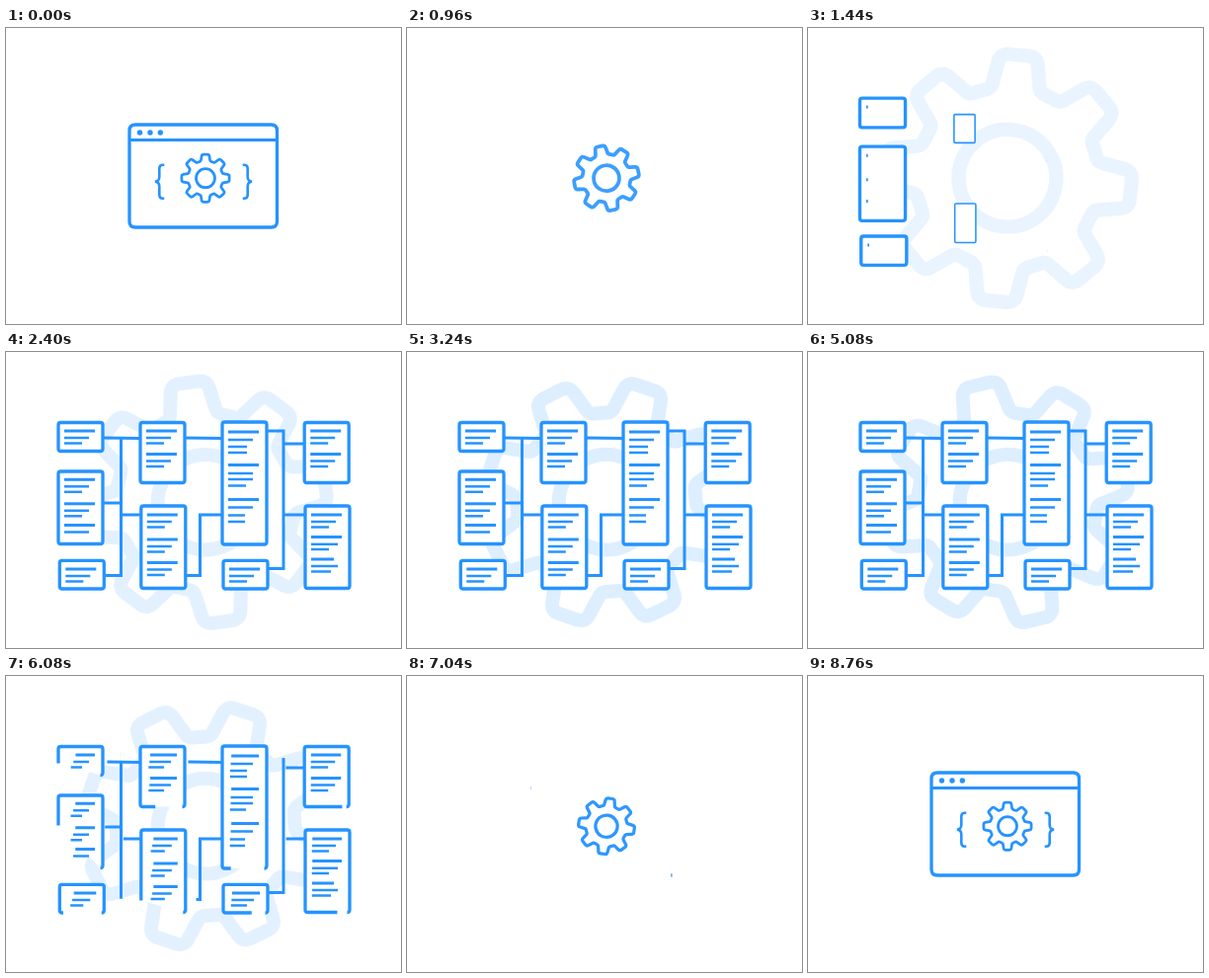
An HTML page for the animation above (9000 ms loop, 400x300 px).

```html
<!DOCTYPE html>
<html lang="en">
<head>
<meta charset="utf-8">
<title>Gear and diagram</title>
<style>
  html, body { margin: 0; width: 100%; height: 100%; overflow: hidden; background: #fff; }
  svg { display: block; width: 100vw; height: 100vh; }
</style>
</head>
<body>
<svg id="stage" viewBox="0 0 400 300" fill="none" stroke="#2693ff"></svg>
<script>
const LOOP = 9000;
const stage = document.getElementById('stage');

function add(tag, attrs, parent = stage) {
  const node = document.createElementNS('http://www.w3.org/2000/svg', tag);
  set(node, attrs);
  parent.appendChild(node);
  return node;
}
function set(node, attrs) {
  for (const key in attrs) node.setAttribute(key, attrs[key]);
}
const clamp = u => Math.min(1, Math.max(0, u));
const ease = u => u < .5 ? 2 * u * u : 1 - 2 * (1 - u) * (1 - u);
const phase = (t, start, length) => ease(clamp((t - start) / length));
const mix = (a, b, u) => a + (b - a) * u;

// Linear interpolation through [time, value] keys.
function track(keys, t) {
  let i = 1;
  while (i < keys.length - 1 && t > keys[i][0]) i++;
  const [t0, a] = keys[i - 1], [t1, b] = keys[i];
  return mix(a, b, clamp((t - t0) / (t1 - t0)));
}

// Shows the part of a path between the fractions from and to.
function trim(node, from, to) {
  set(node, {
    visibility: to - from > .0005 ? 'visible' : 'hidden',
    'stroke-dasharray': from <= 0 && to >= 1 ? 'none' : `0 ${from} ${to - from} 2`
  });
}
const stroke = (d, width, parent) => add('path', { d, 'stroke-width': width, pathLength: 1 }, parent);

// Rounded rectangle starting at the bottom right, running clockwise.
function roundRect(x, y, w, h, r) {
  const X = x + w, Y = y + h;
  return `M${X - r} ${Y}H${x + r}Q${x} ${Y} ${x} ${Y - r}V${y + r}Q${x} ${y} ${x + r} ${y}` +
    `H${X - r}Q${X} ${y} ${X} ${y + r}V${Y - r}Q${X} ${Y} ${X - r} ${Y}Z`;
}

function gearPath() {
  const tooth = [[-4.75, -17.3, .8], [-3.6, -24.1, 1.7], [3.6, -24.1, 1.7], [4.75, -17.3, .8]];
  const points = [];
  for (let k = 0; k < 8; k++) {
    const c = Math.cos(k * Math.PI / 4), s = Math.sin(k * Math.PI / 4);
    for (const [x, y, r] of tooth) points.push([x * c - y * s, x * s + y * c, r]);
  }
  const toward = (p, q) => {
    const u = p[2] / Math.hypot(q[0] - p[0], q[1] - p[1]);
    return `${mix(p[0], q[0], u)} ${mix(p[1], q[1], u)}`;
  };
  const n = points.length;
  return points.map((p, i) =>
    `${i ? 'L' : 'M'}${toward(p, points[(i + n - 1) % n])}Q${p[0]} ${p[1]} ${toward(p, points[(i + 1) % n])}`
  ).join('') + 'Z';
}

const gear = add('g', { 'stroke-width': 2.75, 'stroke-linejoin': 'round' });
add('path', { d: gearPath() }, gear);
add('circle', { r: 9.5 }, gear);

// Browser window
const frame = [
  stroke(roundRect(125, 98, 149.5, 104, 6), 3.3),
  stroke('M125 113.5H274.5', 3.2)
];
const dots = [135.5, 146, 156.3].map(x => [x, 106, add('circle', { r: 2.7, fill: '#2693ff', stroke: 'none' })]);
const brace = 'M5 -17H3.5Q0 -17 0 -13.5V-5Q0 0 -4.5 0Q0 0 0 5V13.5Q0 17 3.5 17H5';
const braces = [[155.3, 1], [244.7, -1]].map(([x, side]) => {
  const holder = add('g', {});
  add('path', { d: brace, 'stroke-width': 2.6, transform: `scale(${side} 1)` }, holder);
  return [x, 155.7, holder];
});

// Connectors
const links = [
  'M99 226.5H116.5V87', 'M98 87L136 87.5', 'M98 153H117', 'M116.5 165H137',
  'M180 87L219 87.5', 'M181 226.5H196.5V165H219',
  'M264 80H281V219.5H265', 'M281 93H302', 'M281 165H303'
].map((d, i) => ({ node: stroke(d, 3), start: 1600 + 60 * i }));

// Cards: x, y, height, column, exit time and text groups
const usual = [[0, 31], [7, 25], [12.5, 18]];
const group = (y, rows = usual) => rows.map(([dy, w]) => [y + dy, w, dy === 0]);
const cards = [
  [53, 71.5, 29, 0, 5650, [group(80)]],
  [53, 121, 73.5, 0, 5655, [group(129.3), group(153.8), group(175.5, usual.slice(0, 2))]],
  [54.3, 211.3, 28.7, 0, 5713, [group(220)]],
  [136, 71.5, 61, 1, 5825, [group(80), group(103.5)]],
  [136.8, 156, 83.5, 1, 5756, [group(165), group(190), group(213.5)]],
  [219, 71, 124, 2, 5856, [
    group(81, [[0, 31], [8, 25], [15, 19], [21, 19]]),
    group(114.5, [[0, 31], [8.5, 25], [14.5, 25], [21, 18]]),
    group(149.5, [[0, 31], [8, 25], [16, 17], [22.5, 17]])]],
  [220, 211.3, 28.7, 2, 5862, [group(220)]],
  [302.2, 71.5, 61, 3, 5980, [group(80), group(103.5)]],
  [303, 156, 83.5, 3, 5940, [
    group(165), group(187.5, [[0, 31], [7.3, 27], [12.5, 18]]),
    group(210, [[0, 23], [7, 27], [12.5, 20]])]]
].map(([x, y, h, column, exit, groups]) => {
  const holder = add('g', {});
  const d = roundRect(x, y, 45, h, 2.5);
  const fill = add('path', { d, fill: '#fff', stroke: 'none' }, holder);
  const outline = stroke(d, 3.3, holder);
  const left = x + 6;
  const lines = groups.flatMap(rows => rows.map(([ly, w, title], i) =>
    ({ node: stroke(`M${left} ${ly}h${w}`, title ? 3 : 2.5), delay: 80 * i })));
  return { holder, fill, outline, lines, d, exit, cx: x + 22.5, cy: y + h / 2,
    start: 1109 + 143 * column, length: outline.getTotalLength() };
});

function place(node, x, y, scale, pivot = false) {
  set(node, {
    visibility: scale > .001 ? 'visible' : 'hidden',
    transform: `translate(${x} ${y}) scale(${scale})` + (pivot ? ` translate(${-x} ${-y})` : '')
  });
}

// The remaining part of a card, closed by a straight chord.
function remainder(card, from) {
  if (from <= 0) return card.d;
  const points = [];
  for (let i = 0; i <= 60; i++) {
    const p = card.outline.getPointAtLength(card.length * mix(from, 1, i / 60));
    points.push(`${p.x} ${p.y}`);
  }
  return 'M' + points.join('L') + 'Z';
}

const turns = [[0, 0], [1440, 50.2], [2400, 82], [4080, 135], [6080, 198.5], [7040, 233], [8240, 270]];
const fades = [[1440, .095], [4200, .175], [6500, .11]];

function drawGear(t) {
  const grow = phase(t, 840, 580), shrink = phase(t, 6520, 610);
  const big = mix(5.2, 5.08, phase(t, 1440, 500));
  const scale = mix(mix(1, big, grow), 1, shrink);
  const opacity = mix(mix(1, track(fades, t), phase(t, 840, 500)), 1, shrink);
  set(gear, { transform: `translate(202 152.2) rotate(${track(turns, t)}) scale(${scale})`, opacity });
}

function drawWindow(t) {
  const leaving = t < 4000;
  const p = leaving ? phase(t, 0, 900) : phase(t, 7000, 1200);
  for (const node of frame) trim(node, leaving ? p : 0, leaving ? 1 : p);
  const pop = (delay, [x, y, node]) =>
    place(node, x, y, leaving ? 1 - phase(t, delay, 450) : phase(t, 7450 + delay, 450));
  dots.forEach((dot, i) => pop(80 * i, dot));
  braces.forEach(item => pop(120, item));
}

function drawCards(t) {
  for (const card of cards) {
    const scale = mix(1.1 * phase(t, card.start, 408), 1, phase(t, card.start + 408, 350));
    const gone = phase(t, card.exit, 1000);
    place(card.holder, card.cx, card.cy, t < card.start || gone >= 1 ? 0 : scale, true);
    trim(card.outline, gone, 1);
    if (card.holder.getAttribute('visibility') === 'hidden') card.outline.setAttribute('visibility', 'hidden');
    card.fill.setAttribute('d', remainder(card, gone));
    for (const line of card.lines) trim(line.node, gone, phase(t, card.start + 266 + line.delay, 400));
  }
  for (const link of links) trim(link.node, phase(t, 5840, 1000), phase(t, link.start, 300));
}

function render(t) {
  drawGear(t);
  drawWindow(t);
  drawCards(t);
}

const began = performance.now();
function tick() {
  render((performance.now() - began) % LOOP);
  requestAnimationFrame(tick);
}
render(0);
requestAnimationFrame(tick);
</script>
</body>
</html>
```
